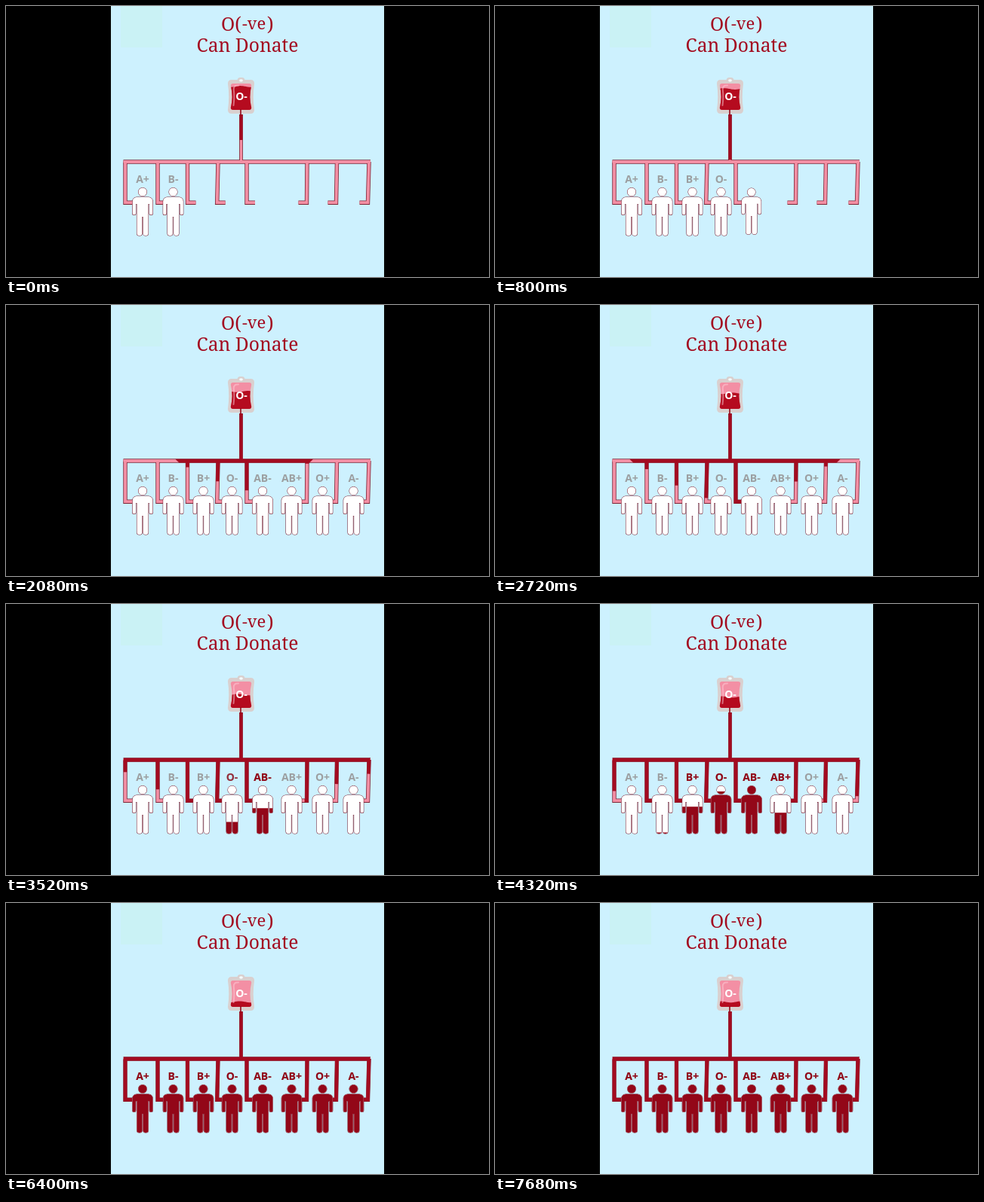
These frames come from a looping animation (640 px wide and 360 px high, 7840 ms). An HTML page with a canvas:

```html
<!DOCTYPE html>
<html lang="en">
<head>
<meta charset="utf-8">
<title>O(-ve) Can Donate</title>
<style>
html, body { margin: 0; width: 100%; height: 100%; overflow: hidden; background: #000; }
canvas { display: block; }
</style>
</head>
<body>
<canvas id="stage" width="640" height="360"></canvas>
<script>
const ctx = document.getElementById('stage').getContext('2d');
const LOOP = 7840, STEP = 160;
const SKY = '#cdf1fe', PINK = '#f38fa4', BLOOD = '#a30b20', DARK = '#930718', EDGE = '#7d2435';
const LABEL = "900 extra-condensed 14px 'Noto Sans', 'Open Sans', sans-serif";
const SERIF = "'Noto Serif', serif";
const MID = 311.5, BAR_Y = 207, FOOT_Y = 261.2;
const BAR_START = 870, LEFT_SPEED = 0.072, RIGHT_SPEED = 0.079, FILL_TIME = 1280;

// label, body centre, pipe top, pipe bottom, time the body starts to fill
const people = [
  ['A+', 181, 158, 158, 5100], ['B-', 221.5, 201, 201, 4280],
  ['B+', 261.5, 240.5, 240.5, 3600], ['O-', 299.5, 281, 279.7, 3200],
  ['AB-', 340, 319, 319, 2840], ['AB+', 378.5, 399, 398.5, 3760],
  ['O+', 419.5, 438.5, 437.5, 4620], ['A-', 460.5, 481, 479.5, 4800]
].map(([label, x, top, bottom, fillAt], i) => {
  const side = bottom < x ? 1 : -1;
  const reach = BAR_START + (top < MID ? (MID - top) / LEFT_SPEED : (top - MID) / RIGHT_SPEED);
  return { label, x, top, bottom, fillAt, side, reach, popAt: 270 * (i - 2) };
});

const clamp = v => Math.max(0, Math.min(1, v));

const body = new Path2D();
body.arc(0, 247, 5.5, 0, 7);
body.closePath();
body.roundRect(-13.3, 254, 26.6, 9, [5.5, 5.5, 0, 0]);
body.roundRect(-13.3, 259, 4.2, 18.5, [0, 0, 2.1, 2.1]);
body.roundRect(9.1, 259, 4.2, 18.5, [0, 0, 2.1, 2.1]);
body.rect(-7.5, 258, 15, 22);
body.roundRect(-7.5, 275, 6.8, 30, [0, 0, 3, 3]);
body.roundRect(0.7, 275, 6.8, 30, [0, 0, 3, 3]);

// bag outline with pinched sides
function pouch(l, t, r, b, pinch, k) {
  const p = new Path2D(), m = (t + b) / 2;
  p.moveTo(l + k, t);
  p.lineTo(r - k, t);
  p.quadraticCurveTo(r, t, r, t + k);
  p.quadraticCurveTo(r - pinch, m, r, b - k);
  p.quadraticCurveTo(r, b, r - k, b);
  p.lineTo(l + k, b);
  p.quadraticCurveTo(l, b, l, b - k);
  p.quadraticCurveTo(l + pinch, m, l, t + k);
  p.quadraticCurveTo(l, t, l + k, t);
  p.closePath();
  return p;
}
const shell = pouch(294, 98, 329, 143, 2.5, 5);
const sac = pouch(297.8, 103, 325.2, 138, 3.5, 3);

function text(str, x, y, font, color, align) {
  ctx.font = font;
  ctx.fillStyle = color;
  ctx.textAlign = align || 'center';
  ctx.fillText(str, x, y);
}

function line(points, width, color, length) {
  ctx.beginPath();
  points.forEach(([x, y]) => ctx.lineTo(x, y));
  ctx.lineWidth = width;
  ctx.strokeStyle = color;
  ctx.setLineDash(length === undefined ? [] : [length, 999]);
  if (length !== 0) ctx.stroke();
  ctx.setLineDash([]);
}

const drop = p => [[p.top, BAR_Y], [p.bottom, FOOT_Y], [p.bottom + p.side * 11, FOOT_Y]];

function drawPipes(t) {
  const bar = [[155.5, BAR_Y], [483, BAR_Y]], stem = [[311.5, 144], [311.5, BAR_Y]];
  for (const [width, color] of [[5.4, EDGE], [3.8, PINK]]) {
    line(stem, width - 0.6, color);
    people.forEach(p => line(drop(p), width, color));
    line(bar, width, color);
  }
  line(stem, 4, BLOOD, Math.min(63, 34 + 0.033 * t));
  people.forEach(p => line(drop(p), 4.6, BLOOD, 66 * clamp((t - p.reach) / (p.fillAt - p.reach))));

  const run = t - BAR_START;
  if (run > 0) {
    const l = Math.max(156, MID - run * LEFT_SPEED), r = Math.min(482.5, MID + run * RIGHT_SPEED);
    const bevel = l > 156 ? Math.min(5, run * 0.05) : 0;
    ctx.fillStyle = BLOOD;
    ctx.beginPath();
    ctx.moveTo(l, 204.7);
    ctx.lineTo(r, 204.7);
    ctx.lineTo(r - bevel, 209.4);
    ctx.lineTo(l + bevel, 209.4);
    ctx.fill();
  }
}

function drawBag(t) {
  ctx.fillStyle = '#d9d0cf';
  ctx.fill(shell);
  ctx.beginPath();
  ctx.roundRect(306.5, 95, 10, 8, 4);
  ctx.fill();
  ctx.fillStyle = '#f4fbfd';
  ctx.beginPath();
  ctx.ellipse(311.5, 99, 2.4, 1.8, 0, 0, 7);
  ctx.fill();
  ctx.fillStyle = PINK;
  ctx.fill(sac);

  const level = 107 + 0.0038 * Math.min(t, 6400);
  ctx.save();
  ctx.clip(sac);
  ctx.fillStyle = '#b50b1f';
  ctx.beginPath();
  ctx.moveTo(297, 139);
  for (let x = 297; x <= 326; x++) ctx.lineTo(x, level + 0.9 * Math.sin(x / 4.6 + t / 500));
  ctx.lineTo(326, 139);
  ctx.fill();
  ctx.restore();

  ctx.lineCap = 'round';
  ctx.beginPath();
  ctx.moveTo(308, 105.5);
  ctx.quadraticCurveTo(301.5, 105, 301.7, 111);
  ctx.quadraticCurveTo(303, 120, 301.5, 132);
  ctx.lineWidth = 2;
  ctx.strokeStyle = 'rgba(255,205,215,.5)';
  ctx.stroke();
  ctx.lineCap = 'butt';
  line([[311, 137], [311, 145]], 1.6, DARK);
  text('O-', 312, 125, LABEL, '#fff');
}

function drawPerson(p, t) {
  const grow = clamp((t - p.popAt) / 270);
  if (!grow) return;
  const filled = clamp((t - p.fillAt) / FILL_TIME), hook = -p.side * 6.5;
  ctx.save();
  ctx.translate(p.x + hook, 254.4);
  ctx.scale(grow, grow);
  ctx.translate(-hook, -254.4);
  ctx.lineWidth = 1.1;
  ctx.strokeStyle = EDGE;
  ctx.stroke(body);
  ctx.fillStyle = '#fff';
  ctx.fill(body);
  if (filled) {
    ctx.beginPath();
    ctx.rect(-15, 305.5 - 64.5 * filled, 30, 65);
    ctx.clip();
    ctx.fillStyle = DARK;
    ctx.fill(body);
  }
  ctx.restore();

  if (grow < 1) return;
  text(p.label, p.x, 235.2, LABEL, '#9c9fa1');
  ctx.globalAlpha = clamp((t - p.fillAt - 100) / 300);
  text(p.label, p.x, 235.2, LABEL, DARK);
  ctx.globalAlpha = 1;
}

function draw(t) {
  ctx.fillStyle = '#000';
  ctx.fillRect(0, 0, 640, 360);
  ctx.fillStyle = SKY;
  ctx.fillRect(139, 0, 362, 360);
  ctx.fillStyle = '#caf2f5';
  ctx.fillRect(152, 0, 55, 55);

  const big = '24.6px ' + SERIF;
  text('O(', 285, 33, big, BLOOD, 'left');
  text('-ve', 313, 30.5, '22px ' + SERIF, BLOOD, 'left');
  text(')', 346, 33, big, BLOOD, 'left');
  text('Can Donate', 320, 61, big, BLOOD);

  drawPipes(t);
  drawBag(t);
  people.forEach(p => drawPerson(p, t));
}

const began = performance.now();
function tick() {
  const t = (performance.now() - began) % LOOP;
  draw(Math.floor(t / STEP) * STEP);
  requestAnimationFrame(tick);
}
tick();
</script>
</body>
</html>
```
